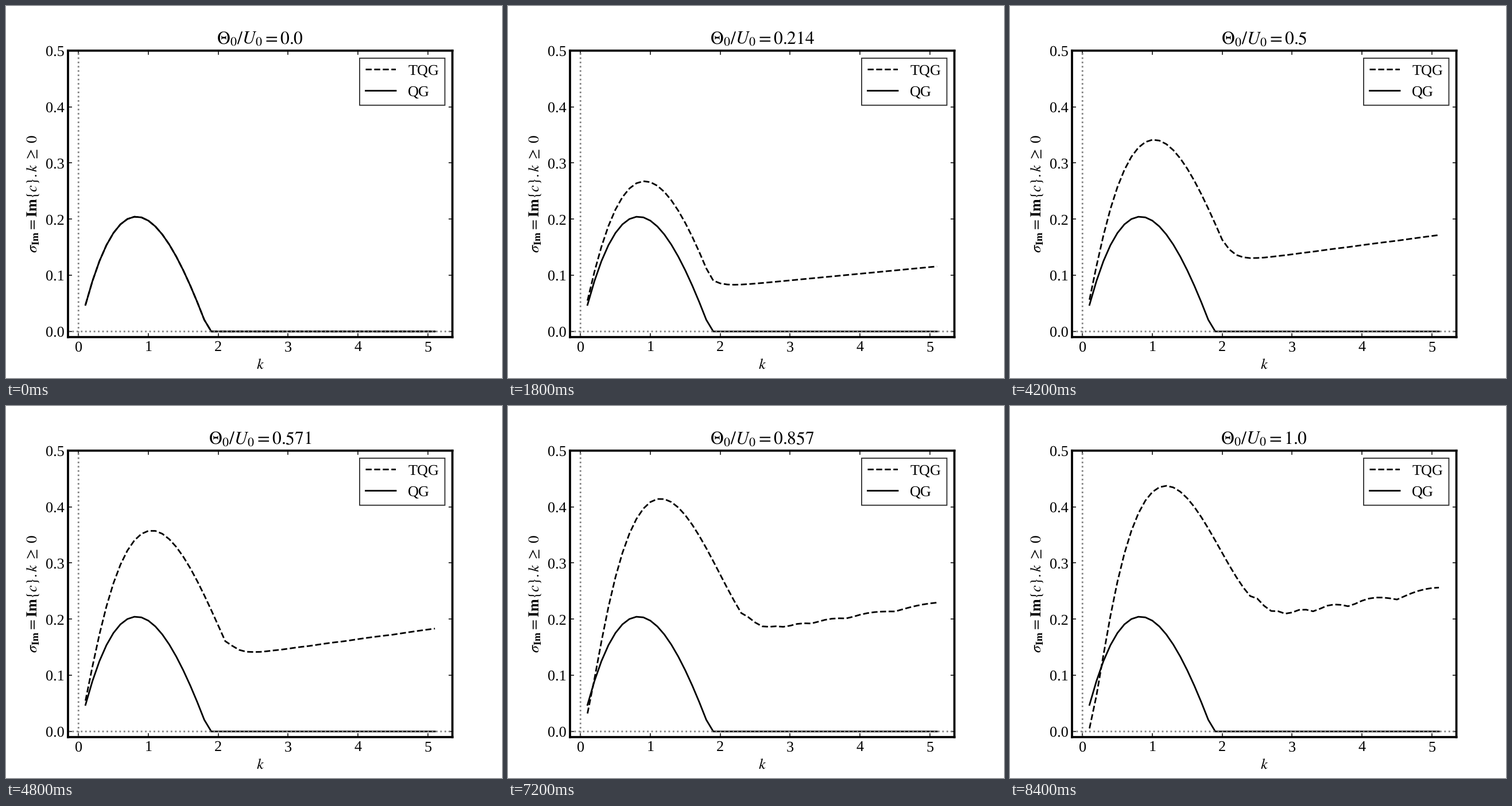
A matplotlib script for the animation above (9 s loop, 864x648 px).

```python
import numpy as np
import matplotlib.pyplot as plt
from matplotlib.animation import FuncAnimation

plt.rcParams.update({
    "font.family": "Liberation Serif",
    "font.size": 14,
    "mathtext.fontset": "stix",
    "text.hinting": "none",
    "path.snap": False,
    "axes.linewidth": 2,
    "xtick.direction": "in",
    "ytick.direction": "in",
    "xtick.top": True,
    "ytick.right": True,
    "legend.fancybox": False,
    "legend.edgecolor": "black",
})

STEPS = 15
k = np.arange(1, 52) / 10


def quad(x, a, b, c):
    return a + b * x + c * x * x


def hump(theta):
    """Main unstable branch: k times a cubic phase speed, damped at small k."""
    u = k - 1.6
    speed = (quad(theta, .051, .268, -.069)
             + quad(theta, -.209, -.097, .044) * u
             + quad(theta, .058, .050, -.031) * u ** 2
             + .021 * theta ** 2 * u ** 3)
    width = quad(theta, .1, .13, -.055)
    damping = np.exp(3.43 * theta - 3.8 - (k - .1) / width)
    return k * (speed - damping)


def tail(theta, cutoff):
    """Short-wave branch: a rising line with lobes evenly spaced in 1/k."""
    line = quad(theta, .203, -.04, .044) + (.0275 - .009 * theta) * (k - 3)
    bend = .01 * np.exp(np.minimum((cutoff - k) / .15, 1.3))
    lobes = np.abs(np.sin(np.pi * (1 / k - .222) / .0395))
    return np.sqrt(theta) * (line + bend) + .0023 * k * theta ** 5 * lobes


def growth(theta):
    cutoff = 1.88 + .8 * theta
    return np.maximum(np.where(k < cutoff, hump(theta), 0),
                      np.where(k > 1.85, tail(theta, cutoff), 0))


fig, ax = plt.subplots(figsize=(6.4, 4.8), dpi=135)
tqg, = ax.plot(k, growth(0), "k--", label="TQG")
ax.plot(k, growth(0), "k-", label="QG")
ax.axvline(0, color="gray", ls=":")
ax.axhline(0, color="gray", ls=":")

ax.set_xlim(-0.15, 5.35)
ax.set_ylim(-0.01, 0.5)
ax.set_xlabel("$k$")
ax.set_ylabel(r"$\sigma_{\mathbf{Im}} = \mathbf{Im}\{c\}. k\ \geq\ 0$")
ax.legend(loc="upper right")
title = ax.set_title("")


def update(n):
    theta = n / (STEPS - 1)
    tqg.set_ydata(growth(theta))
    title.set_text(rf"$\Theta_0/U_0={round(theta, 3)}$")
    return tqg, title


anim = FuncAnimation(fig, update, frames=STEPS, interval=600,
                     repeat=True, repeat_delay=0, blit=False)
plt.show()
```
